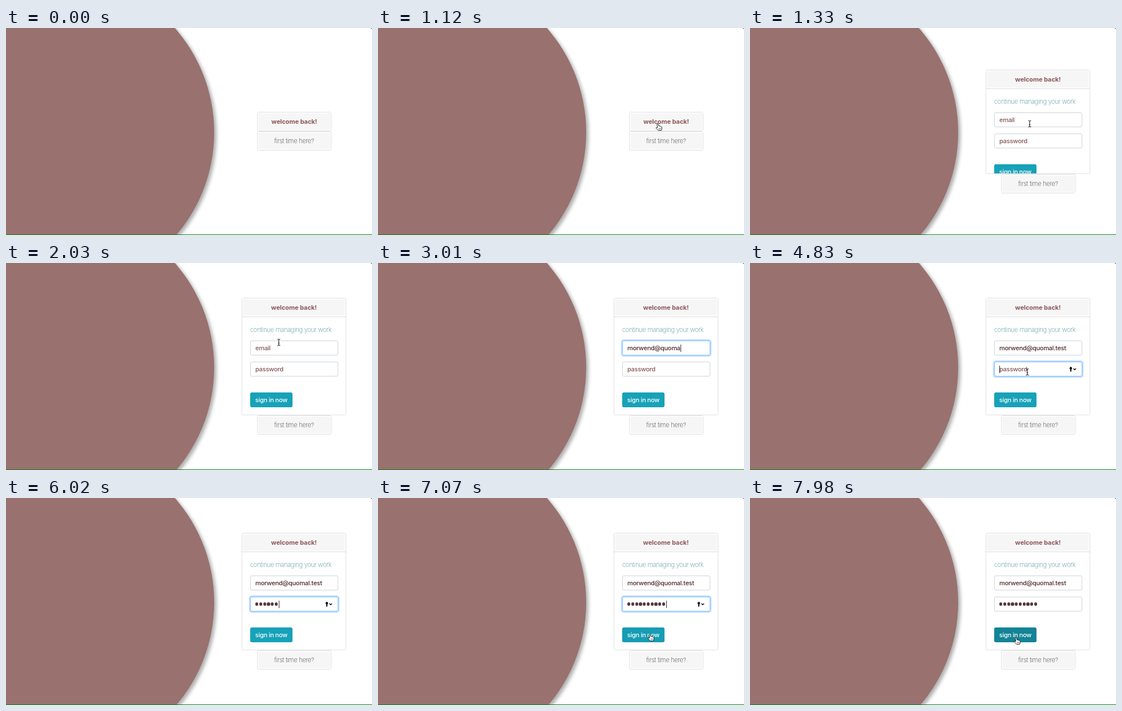
An HTML page that plays this animation: 640 by 363 pixels, repeating every 8 s.

```html
<!DOCTYPE html>
<html lang="en">
<head>
<meta charset="utf-8">
<title>Sign in</title>
<style>
  * { box-sizing: border-box; }
  html, body { margin: 0; width: 100%; height: 100%; overflow: hidden; background: #fff; }
  #stage {
    position: absolute; left: 0; top: 0; width: 640px; height: 363px; overflow: hidden;
    background: #fff; font: 500 11px/26px Inter, "Open Sans", sans-serif;
    letter-spacing: -.3px; white-space: nowrap;
  }
  #stage div, #stage svg { position: absolute; }
  #disc {
    left: -192px; top: -95.5px; width: 556px; height: 556px; border-radius: 50%;
    background: #99716f; box-shadow: 4px 4px 6px rgba(0, 0, 0, .32);
  }
  #edge { left: 0; top: 362px; width: 640px; height: 1px; background: #128012; }
  #corner { right: 0; top: 0; width: 2px; height: 1px; background: #3a6b3c; }
  .card { background: #fff; border: 1px solid #e2e2e2; border-radius: 3px; overflow: hidden; }
  .head {
    left: 0; right: 0; top: 0; height: 33px; line-height: 32px; text-align: center;
    background: #f6f6f6; border-bottom: 1px solid #dfdfdf; box-shadow: inset 0 0 0 2px #fbfbfb;
  }
  #first { left: 439px; width: 130px; height: 34px; }
  #first .head, #lead { font-weight: 200; letter-spacing: -.28px; }
  #first .head { color: #3f3a3a; }
  #back .head { font-weight: 700; letter-spacing: -.1px; color: #8d575a; }
  #body { left: 0; top: 33px; width: 181px; height: 172px; }
  #lead { left: 14px; top: 9px; color: #438a90; }
  .field {
    left: 14px; width: 154px; height: 26px; padding-left: 8px; display: flex; align-items: center;
    border: 1px solid #ced4da; border-radius: 3px; background: #fff; color: #50292c;
  }
  .field span { line-height: 24px; }
  .hint { color: #85565a; }
  .caret { width: 1px; height: 13px; margin-right: -1px; background: #3c2a2b; }
  .dot { width: 5.25px; height: 5.25px; margin-right: 1.5px; border-radius: 50%; background: #54393b; }
  #mail { top: 41px; }
  #pass { top: 78px; }
  #key { right: 8px; top: 7px; }
  #send {
    left: 14px; top: 132px; width: 74px; height: 26px; border-radius: 3px;
    text-align: center; color: #fff;
  }
  .cursor { left: 0; top: 0; overflow: visible; }
</style>
</head>
<body>
<div id="stage">
  <div id="disc"></div>
  <div class="card" id="back">
    <div class="head">welcome back!</div>
    <div id="body">
      <div id="lead">continue managing your work</div>
      <div class="field" id="mail"><span class="val"></span><i class="caret"></i><span class="hint">email</span></div>
      <div class="field" id="pass"><span class="val" style="display:flex"></span><i class="caret"></i><span class="hint">password</span>
        <svg id="key" width="14" height="11" viewBox="0 0 14 11">
          <path d="M3 1a2.6 2.6 0 0 1 1 4.8V9L3 10 2 9V5.8A2.6 2.6 0 0 1 3 1z" fill="#111"/>
          <path d="M7.5 4l2.3 2.3L12.1 4" fill="none" stroke="#111" stroke-width="1.4"/>
        </svg>
      </div>
      <div id="send">sign in now</div>
    </div>
  </div>
  <div class="card" id="first"><div class="head">first time here?</div></div>
  <div id="edge"></div>
  <div id="corner"></div>

  <svg class="cursor" id="beam" width="1" height="1">
    <path d="M-2.5-5.5Q0-5.5 0-4Q0-5.5 2.5-5.5M0-4V4M-2.5 5.5Q0 5.5 0 4Q0 5.5 2.5 5.5M-1.3 1.5H1.3" fill="none" stroke="#222" stroke-width="1.1"/>
  </svg>
  <svg class="cursor" id="hand" width="1" height="1">
    <path d="M-1.2.8Q-1-.4 0-.3Q1-.2 1.3 1L2 4Q3.2 3.2 4 4.3Q5.2 3.7 5.8 4.9Q7.2 4.6 7.4 6.2L7.5 8.6L6.5 11.6H1.2L-2.8 7.4Q-3 5.6 0 6.4z" fill="#fff" stroke="#111" stroke-width=".9" stroke-linejoin="round"/>
    <path d="M2.2 7.5V9.8M3.8 7.5V9.8M5.4 7.5V9.8" stroke="#111" stroke-width=".6"/>
  </svg>
  <svg class="cursor" id="arrow" width="1" height="1">
    <path d="M0 0V11L2.5 8.7L4.2 12.5L6 11.7L4.3 8H7.8z" fill="#111" stroke="#fff" stroke-width=".9"/>
  </svg>
</div>
<script>
const LOOP = 8000, STEP = 70;
const EMAIL = 'morwend@quomal.test';
const OPEN = 1128, MAIL = 2380, PASS = 3780, SEND = 7420, HOVER = 7050;
const DOTS = [5530, 5600, 5670, 5810, 5880, 6020, 6160, 6300, 6440, 6580];
const $ = id => document.getElementById(id);

// Pointer: time, x, y, shape shown from that time on
const PATH = [
  [0, 500, 262, ''],
  [70, 500, 262, 'arrow'],
  [280, 495, 213, 'hand'],
  [560, 489, 168, 'hand'],
  [1190, 489, 168, 'beam'],
  [1540, 489, 168, 'beam'],
  [2030, 477, 139, 'beam'],
  [2240, 474, 148, 'beam'],
  [2450, 474, 148, ''],
  [3430, 474, 148, 'beam'],
  [3780, 485, 191, 'beam'],
  [5530, 485, 191, ''],
  [6790, 485, 191, 'beam'],
  [6860, 482, 205, 'arrow'],
  [7000, 476, 234, 'hand'],
  [7070, 475, 239, 'hand'],
  [7560, 466, 244, 'hand'],
  [7840, 466, 244, 'hand'],
  [7980, 465, 245, 'hand']
];

const clamp = v => Math.min(1, Math.max(0, v));
const mix = (a, b, p) => a + (b - a) * p;
const blend = (a, b, p) => `rgb(${a.map((v, i) => Math.round(mix(v, b[i], p)))})`;

// CSS "ease", solved by bisection
function ease(x) {
  let lo = 0, hi = 1;
  for (let i = 0; i < 20; i++) {
    const m = (lo + hi) / 2, n = 1 - m;
    if (.75 * n * m + m ** 3 < x) lo = m; else hi = m;
  }
  const n = 1 - lo;
  return .3 * n * n * lo + 3 * n * lo * lo + lo ** 3;
}
const fade = (t, start, span = 150) => {
  const p = clamp((t - start) / span);
  return p === 0 || p === 1 ? p : ease(p);
};

function setField(el, focus, caret, filled) {
  el.style.borderColor = blend([206, 212, 218], [128, 189, 255], focus);
  el.style.boxShadow = `0 0 0 2.2px rgba(0,123,255,${.25 * focus})`;
  el.querySelector('.caret').style.visibility = caret ? 'visible' : 'hidden';
  el.querySelector('.hint').style.display = filled ? 'none' : '';
}

function drawCards(t) {
  const open = t >= OPEN, h = Math.round(172 * fade(t, OPEN, 350));
  const top = Math.round(147 - h / 2);
  Object.assign($('back').style, {
    left: (open ? 412 : 439) + 'px', width: (open ? 183 : 130) + 'px',
    top: top + 'px', height: 34 + h + 'px'
  });
  $('first').style.top = top + 34 + h + 'px';
  $('body').style.display = open ? '' : 'none';
}

function drawForm(t) {
  const typed = Math.round(EMAIL.length * clamp((t - MAIL) / 910));
  $('mail').querySelector('.val').textContent = EMAIL.slice(0, typed);
  setField($('mail'), fade(t, MAIL) - fade(t, PASS - STEP), t >= MAIL && t < PASS - STEP, typed);

  const keys = DOTS.filter(k => k <= t);
  const inPass = t >= PASS && t < SEND;
  const since = t - (keys.length ? keys[keys.length - 1] : PASS);
  $('pass').querySelector('.val').innerHTML = '<i class="dot"></i>'.repeat(keys.length);
  setField($('pass'), fade(t, PASS - STEP) - fade(t, SEND), inPass && since % 1000 < 500, keys.length);
  $('key').style.display = inPass ? '' : 'none';

  $('send').style.background = blend([23, 162, 184], [19, 132, 150], fade(t, HOVER));
}

function drawCursor(t) {
  let i = PATH.length - 1;
  while (PATH[i][0] > t) i--;
  const a = PATH[i], b = PATH[i + 1] || a;
  const p = b === a ? 0 : (t - a[0]) / (b[0] - a[0]);
  for (const id of ['beam', 'hand', 'arrow']) {
    const s = $(id).style;
    s.display = a[3] === id ? '' : 'none';
    s.transform = `translate(${mix(a[1], b[1], p)}px,${mix(a[2], b[2], p)}px)`;
  }
}

const start = performance.now();
let last = -1;
function tick() {
  const now = Math.max(0, performance.now() - start) % LOOP;
  const t = Math.floor(now / STEP) * STEP;
  if (t !== last) {
    last = t;
    drawCards(t);
    drawForm(t);
    drawCursor(t);
  }
  requestAnimationFrame(tick);
}
tick();
</script>
</body>
</html>
```
